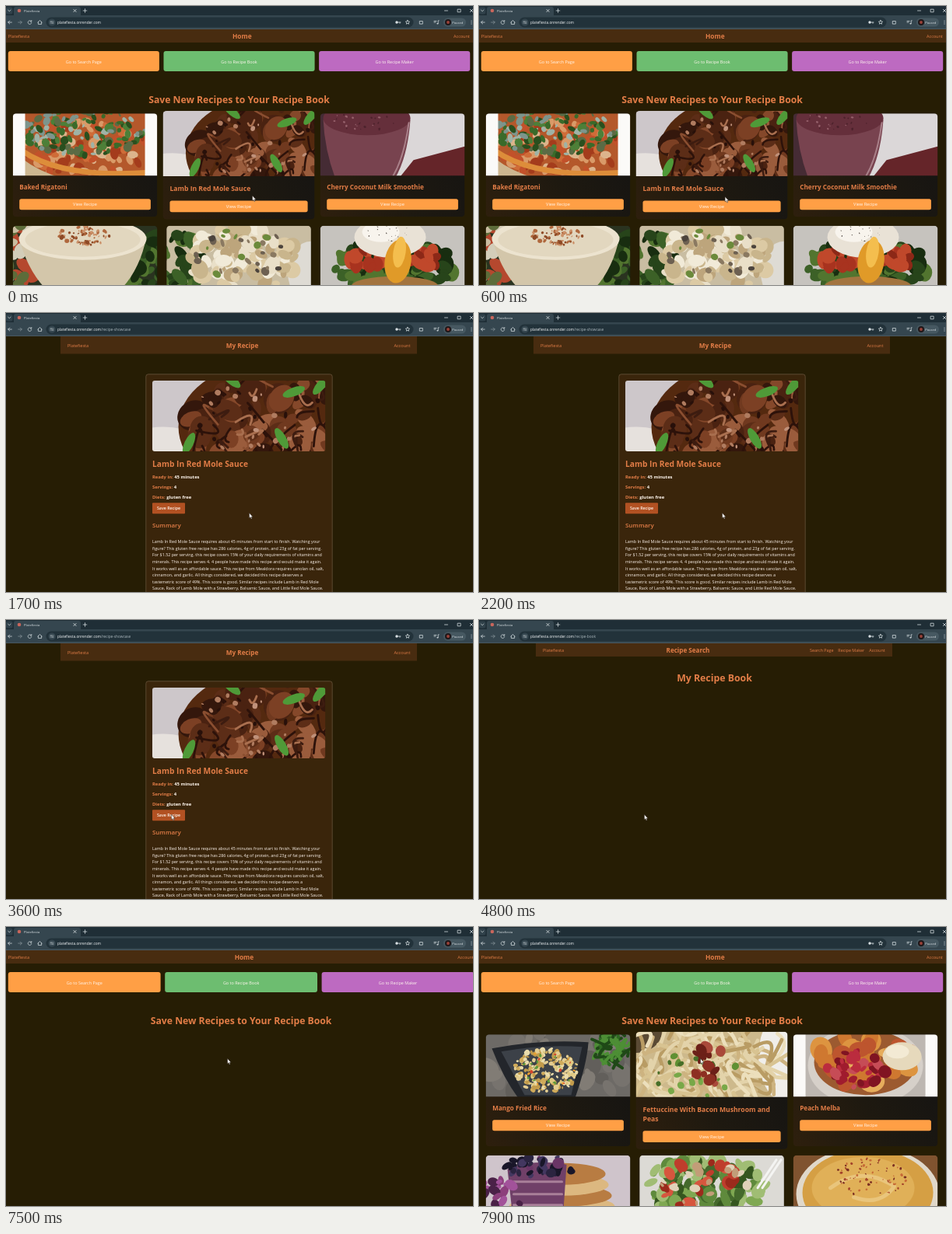
Write an HTML page that moves like this. It is 600x359 px and loops after 8000 ms.

```html
<!DOCTYPE html>
<html lang="en">
<head>
<meta charset="utf-8">
<title>Recipe app walkthrough</title>
<style>
html, body { margin: 0; width: 100%; height: 100%; overflow: hidden; background: #271e04; }
#stage { display: block; width: 600px; height: 359px; font-family: "Open Sans", "Noto Sans", sans-serif; }
text { white-space: pre; }
</style>
</head>
<body>
<svg id="stage" viewBox="0 0 600 359"></svg>
<script>
const LOOP = 8000;
const APP = 'Platefiesta';
const C = { page: '#261d04', nav: '#482c10', accent: '#e27d47', orange: '#ff9f45', hover: '#e98b16', green: '#6dbd70',
  purple: '#bd6ac1', white: '#fff6ee', save: '#b25122', saveHover: '#984218', bar: '#35464f', ink: '#d9e0e3' };

// ---------- drawing helpers ----------
const num = v => +v.toFixed(1);
const rect = (x, y, w, h, fill, r = 0, more = '') =>
  `<rect x="${num(x)}" y="${num(y)}" width="${num(w)}" height="${num(h)}" rx="${r}" fill="${fill}" ${more}/>`;
const oval = (x, y, rx, ry, fill, turn = 0) =>
  `<ellipse rx="${num(rx)}" ry="${num(ry)}" fill="${fill}" transform="translate(${num(x)} ${num(y)}) rotate(${num(turn)})"/>`;
const shape = (d, fill) => `<path d="${d}" fill="${fill}"/>`;
const line = (d, color, w = 1) =>
  `<path d="${d}" fill="none" stroke="${color}" stroke-width="${w}" stroke-linecap="round" stroke-linejoin="round"/>`;
const text = (s, x, y, size, fill, weight = 500, anchor = 'start') =>
  `<text x="${num(x)}" y="${num(y)}" font-size="${size}" fill="${fill}" font-weight="${weight}" text-anchor="${anchor}">${s}</text>`;

let seeds = 0;
function scatter([cx, cy, rx, ry], n, colors, draw) {
  const palette = colors.split(' ');
  let s = ++seeds * 48271, out = '';
  const r = () => (s = s * 16807 % 2147483647) / 2147483647;
  for (let i = 0; i < n; i++) {
    const a = r() * 2 * Math.PI, d = Math.sqrt(r());
    out += draw(cx + Math.cos(a) * d * rx, cy + Math.sin(a) * d * ry, palette[Math.floor(r() * palette.length)], r);
  }
  return out;
}

const blobs = (zone, n, size, colors) => scatter(zone, n, colors, (x, y, color, r) => {
  const w = size * (.4 + .6 * r());
  return oval(x, y, w, w * (.45 + .5 * r()), color, r() * 180);
});

const strands = (zone, n, len, width, colors) => scatter(zone, n, colors, (x, y, color, r) => {
  const off = () => num((r() - .5) * 2 * len);
  return line(`M${num(x)} ${num(y)}q${off()} ${off()} ${off()} ${off()}`, color, width);
});

// ---------- food pictures ----------
const W = 186, H = 80;
const ground = color => rect(-9, -9, 330, 250, color);
const sides = [0, 170].map(x => rect(x, -9, 16, 99, '#fbfaf8')).join('');
const GREENS = '#27441a #3c6127 #182d10 #52752f';

const art = {
  lamb: ground('#cdc7ca') + oval(20, 190, 90, 55, '#e6e1dd') + oval(195, 135, 148, 112, '#54290f') +
    blobs([195, 130, 140, 100], 100, 30, '#5c2d17 #70391f #85482a #9a5c3c #4a2211 #34170c #7c4024') +
    strands([195, 125, 125, 85], 34, 34, 4, '#2d120a #a96f4f #8a4e30 #3d1c10') +
    blobs([195, 120, 125, 80], 30, 6, '#c0917a #b07c60 #28100a') +
    [[255, 72, -20], [142, 50, 40], [66, 165, 115], [233, 156, 60], [304, 60, 130]]
      .map(([x, y, turn]) => oval(x, y, 21, 8, '#4f9a38', turn)).join(''),

  rigatoni: ground('#b4582b') +
    blobs([92, 44, 84, 36], 90, 9, '#c2512a #cf6c38 #d99a68 #a43c1c #dcb48c') +
    blobs([92, 24, 80, 30], 150, 6, '#3a6a2a #4d7f38 #2a4f1e #9fb3a6 #7d958c #5b6b45') +
    line('M12 48Q64 84 176 76', '#dd8d3a', 7) + shape('M12 58Q40 80 90 90H12Z', '#cdb791') + sides,

  smoothie: ground('#dbd7d8') + rect(-9, -9, 40, 99, '#452b34') + shape('M96 90L120 60 195 40V90Z', '#652529') +
    shape('M4 8H116Q112 62 92 90H22Q6 50 4 8Z', '#78434f') + oval(60, 6, 56, 22, '#652f3b') +
    blobs([56, 8, 42, 14], 26, 2, '#95606a #4d222c') + line('M114 12Q108 56 94 80', '#a98089', 2),

  eggnog: ground('#2a3320') + blobs([8, 40, 24, 45], 26, 14, '#b5482e #d3cdb9 #5d6c3a #c9bda0') +
    blobs([172, 50, 26, 45], 34, 14, GREENS) +
    shape('M8 14Q20 64 52 90H130Q162 64 172 14Z', '#d3c6aa') + oval(90, 17, 82, 27, '#ece3cf') + oval(90, 18, 74, 22, '#e2d7bf') +
    blobs([92, 13, 34, 12], 70, 3, '#b0683d #8e4a26 #cb9068'),

  creamy: ground('#c9bda2') + oval(186, 60, 30, 40, '#dedbd4') + blobs([14, 50, 30, 40], 44, 13, GREENS) +
    blobs([98, 42, 72, 42], 110, 13, '#e9dfc8 #dccaa4 #c9b58c #f1ead8 #bda57c') +
    blobs([98, 34, 64, 34], 30, 6, '#4c443d #6d6051 #8a7961 #6b8a3b'),

  egg: ground('#c6c3be') + blobs([93, 52, 80, 30], 110, 14, GREENS) + oval(96, 78, 56, 13, '#a3743f') +
    blobs([60, 42, 26, 14], 16, 13, '#a8331f #c0482b #8c2817') + blobs([136, 44, 20, 14], 14, 12, '#a8331f #c0482b #8c2817') +
    oval(90, 15, 46, 26, '#e9e2d6') + oval(78, 8, 24, 13, '#f8f4ed') + oval(100, 46, 17, 28, '#e09a28', 8) + oval(102, 34, 8, 20, '#f4be4e', 8) +
    blobs([92, 10, 32, 12], 20, 1, '#49403a'),

  rice: ground('#6d6a66') + blobs([93, 40, 95, 45], 50, 18, '#77736e #625f5b #817c75') +
    strands([162, 16, 24, 20], 40, 20, 4, '#2f6b22 #4d8e35 #1f4917') +
    shape('M8 18Q70 6 132 10Q130 40 112 90H48Q24 60 8 18Z', '#23262b') + shape('M20 22Q74 12 124 16L110 78H50Z', '#3c4148') +
    blobs([78, 46, 42, 28], 170, 4, '#dfc882 #d0ab5a #eadcac #c29b4b #e3cc90') + blobs([78, 46, 38, 24], 30, 2.5, '#d4452c #5e9a3a #f2a02c'),

  fettuccine: ground('#cdb98c') + oval(190, 30, 40, 60, '#f0eeea') + oval(0, 0, 32, 26, '#5a4a34') +
    strands([84, 42, 88, 48], 120, 44, 4.5, '#e3d3aa #cdb380 #ecdfbc #b99c64 #d8c391') +
    blobs([74, 50, 54, 30], 30, 5, '#5f9033 #78a848 #476f28') + blobs([92, 42, 26, 24], 18, 9, '#8d2f22 #a9493a #6c2018'),

  melba: ground('#bdb7b1') + oval(93, 40, 74, 52, '#d6d0c9') + oval(93, 36, 66, 42, '#9c5a30') +
    blobs([93, 32, 62, 32], 40, 17, '#dd9440 #e6ad5c #cf7830 #bd552e') + blobs([82, 44, 38, 24], 44, 9, '#a01c2e #bb2c3e #801422 #c64c56') +
    oval(140, 28, 25, 18, '#e6d9bc') + oval(134, 22, 15, 9, '#f3ead4') + sides,

  pancakes: ground('#cfc4cb') + [66, 52, 38, 24].map((y, i) => oval(98, y, 68 - i * 4, 14, i % 2 ? '#b87c42' : '#dcb880')).join('') +
    shape('M28 18Q64 4 104 12L100 70 34 72Z', '#704068') + [34, 50, 64].map(y => line(`M36 ${y}H98`, '#a98099', 3)).join('') +
    blobs([72, 14, 46, 13], 36, 8, '#2b2440 #433760 #191629 #6a3566') + blobs([16, 54, 30, 28], 36, 9, '#a2529a #d9c9d4 #4a2147 #8c3f7c'),

  salad: ground('#dcdad5') + blobs([82, 40, 76, 40], 110, 13, '#5f8a3c #7fa852 #44692c #a0bd74 #35561f') +
    blobs([84, 38, 62, 30], 26, 10, '#bf3d2c #d6563e #9c2a1c') + blobs([84, 38, 60, 28], 20, 7, '#e0d2b8 #c29d78') +
    [0, 6].map(x => line(`M${176 + x} 6L${152 + x} 42`, '#f4f4f2', 3)).join(''),

  soup: ground('#80532f') + oval(96, 50, 92, 62, '#e0d8ca') + oval(96, 48, 84, 56, '#d59f44') + oval(90, 42, 66, 40, '#e0b058') +
    line('M48 42Q88 12 130 40Q112 66 78 54', '#e9c57c', 5) + blobs([100, 28, 46, 25], 70, 2, '#a3432a #c66a36 #7c2f22')
};
const photo = (name, w, h) =>
  `<svg width="${w}" height="${h}" viewBox="0 0 ${name === 'lamb' ? '312 231' : `${W} ${H}`}" preserveAspectRatio="xMidYMid slice">
  <g filter="url(#soft)">${art[name]}</g></svg>`;

let clips = 0;
function clipped(w, h, r, body) {
  const id = 'clip' + clips++;
  return `<clipPath id="${id}"><rect width="${w}" height="${h}" rx="${r}"/></clipPath><g clip-path="url(#${id})">${body}</g>`;
}

// ---------- page parts ----------
function card(x, y, w, h, name, titles, raised = false, id = '') {
  const top = 98.5 + 11.5 * titles.length;
  const body = rect(0, 0, w, h, 'url(#cardFill)') + photo(name, w, H) +
    titles.map((s, i) => text(s, 8.5, 98 + 12 * i, 8.2, C.accent, 700)).join('') +
    rect(8.5, top, w - 17, 14, C.orange, 2.5, id && `id="${id}"`) +
    text('View Recipe', w / 2, top + 9.2, 5.6, C.white, 500, 'middle');
  const lift = raised ? `translate(${w / 2} ${h / 2}) scale(1.05) translate(${-w / 2} ${-h / 2})` : '';
  return `<g transform="translate(${x} ${y}) ${lift}">${clipped(w, h, 4.5, body)}</g>`;
}

// Two rows of three; the middle card of the first row is raised.
function grid(h, names, titles, id) {
  return names.split(' ').map((name, i) => {
    const row = Math.floor(i / 3), mid = i === 1;
    return card(num(8.7 + 197.5 * (i % 3)), num(138.3 + row * (h + 11.4)), 185.7, h, name, titles[i] || [''], mid, mid ? id : '');
  }).join('');
}

function home(width, content) {
  const pitch = (width - 1) / 3, w = pitch - 5.6;
  const links = [['Search Page', C.orange], ['Recipe Book', C.green], ['Recipe Maker', C.purple]];
  return rect(0, 30, width, 17, C.nav) + text(APP, 2.8, 41, 5.6, C.accent) +
    text('Home', width / 2 + 3.3, 42, 8.3, C.accent, 700, 'middle') + text('Account', width - 4.2, 41, 5.5, C.accent, 500, 'end') +
    links.map(([s, fill], i) => rect(2.8 + i * pitch, 58, w, 26, fill, 3) +
      text('Go to ' + s, 2.8 + i * pitch + w / 2, 73.6, 5.45, C.white, 500, 'middle')).join('') +
    text('Save New Recipes to Your Recipe Book', width / 2 - .5, 124.8, 12.2, C.accent, 700, 'middle') + content;
}

const summary = [
  'Lamb In Red Mole Sauce requires about 45 minutes from start to finish. Watching your',
  'figure? This gluten free recipe has 286 calories, 4g of protein, and 23g of fat per serving.',
  'For $1.52 per serving, this recipe covers 15% of your daily requirements of vitamins and',
  'minerals. This recipe serves 4. 4 people have made this recipe and would make it again.',
  'It works well as an affordable sauce. This recipe from Mealdora requires canolan oil, salt,',
  'cinnamon, and garlic. All things considered, we decided this recipe deserves a',
  'tastemetric score of 49%. This score is good. Similar recipes include Lamb in Red Mole',
  'Sauce, Rack of Lamb Mole with a Strawberry, Balsamic Sauce, and Little Red Mole Sauce.'
];
const facts = [['Ready in:', '45 minutes'], ['Servings:', '4'], ['Diets:', 'gluten free']];

const recipe = rect(70, 30, 458, 22.5, C.nav) + text(APP, 79, 43.6, 5.6, C.accent) +
  text('My Recipe', 303.5, 45, 8.2, C.accent, 700, 'middle') + text('Account', 519.5, 43.6, 5.6, C.accent, 500, 'end') +
  rect(179.8, 78.8, 239.4, 300, '#3a250b', 3, 'stroke="#6d5b43" stroke-width=".7"') +
  `<g transform="translate(188 87)">${clipped(222.4, 91, 3, photo('lamb', 222.4, 91))}</g>` +
  text('Lamb In Red Mole Sauce', 188, 197.8, 10.2, C.accent, 700) +
  facts.map(([k, v], i) => text(`${k} <tspan fill="${C.white}">${v}</tspan>`, 188, 213 + 13 * i, 5.85, C.accent, 700)).join('') +
  rect(188, 244.2, 42, 14, C.save, 1, 'id="save"') + text('Save Recipe', 209, 253.3, 5.3, C.white, 600, 'middle') +
  text('Summary', 188, 275.6, 7.9, C.accent, 600) +
  summary.map((s, i) => text(s, 188, 296.2 + 8.57 * i, 5.36, C.white)).join('');

const book = rect(73, 30, 458, 17, C.nav) + text(APP, 82, 41, 5.6, C.accent) +
  text('Recipe Search', 268.5, 42, 8.1, C.accent, 700, 'middle') +
  text('Search Page', 425, 41, 5.4, C.accent) + text('Recipe Maker', 461.3, 41, 5.4, C.accent) + text('Account', 501.3, 41, 5.4, C.accent) +
  text('My Recipe Book', 302.5, 79, 12.3, C.accent, 700, 'middle') +
  `<g id="saved">${card(88, 93, 135, 132.5, 'lamb', ['Lamb In Red Mole Sauce'])}</g>`;

// ---------- browser frame ----------
const icon = (x, y, d, turn = 0) => `<g transform="translate(${x} ${y}) rotate(${turn})">${line(d, C.ink, .75)}</g>`;
const plus = 'M-2.3 0H2.3M0-2.3V2.3', arrow = 'M2.3 0H-2.3M-.3-2L-2.3 0-.3 2', box = 'M-1.8-1.8H1.8V1.8H-1.8Z';
const star = 'M' + Array.from({ length: 10 }, (_, i) => {
  const a = i * Math.PI / 5, r = i % 2 ? 1.3 : 2.7;
  return `${num(Math.sin(a) * r)} ${num(-Math.cos(a) * r)}`;
}).join('L') + 'Z';

const browser = rect(0, 0, 600, 30, C.bar) + rect(0, 0, 600, 12, '#1f2e36') + rect(10, 1, 86, 14, C.bar, 3) +
  rect(0, 1.5, 8.5, 9, '#30414a', 2.5) + icon(4.3, 6, 'M-1.7-.8L0 .8 1.7-.8') +
  oval(17, 6, 2.3, 2.3, '#c9665c') + text(APP, 23, 7.6, 4.2, C.ink) +
  icon(88.5, 6, plus, 45) + icon(101.5, 6, plus) + icon(565.5, 6, 'M-2 0H2') + icon(582.3, 6, box) + icon(598, 6, plus, 45) +
  icon(5, 21, arrow) + `<g opacity=".5">${icon(18, 21, arrow, 180)}</g>` +
  icon(30.5, 21, 'M1.8-1.4A2.3 2.3 0 1 0 2.3.6M2.3-2.5V-1H.8') + icon(43.5, 21, 'M-2.1-.4V2.4H2.1V-.4M-2.6 0L0-2.5 2.6 0') +
  rect(51.5, 14.5, 472, 13, '#22323a', 6.5) + oval(59, 21, 4.6, 4.6, C.bar) + icon(59, 21, 'M-2-1H.4M1.8-1H2M2 1H-.4M-1.8 1H-2') +
  `<text x="66" y="22.8" font-size="4.75" font-weight="500" fill="#f2f5f6">platefiesta.onrender.com<tspan id="path" fill="#aab6bc"></tspan></text>` +
  oval(502, 21, 1.7, 1.7, C.ink) + icon(505, 21, 'M-2 0H2M1 0V1.3') + icon(516, 21, star) +
  icon(533.5, 21.3, box) + icon(552, 21, 'M-2-1.6H1M-2 0H0M3.2 1.7V-2.2H4.2') + oval(554.4, 22.7, 1, .8, C.ink) +
  rect(562, 15.5, 29, 11, '#465861', 5.5) + oval(568, 21, 4, 4, '#1e1719') + oval(568, 21, 1.9, 1.9, '#9c4238') +
  text('Paused', 573.2, 22.6, 4.1, C.ink) + [19, 21, 23].map(y => oval(598, y, .6, .6, C.ink)).join('') +
  rect(0, 29.2, 600, .8, '#4d5c63');

const first = grid(133, 'rigatoni lamb smoothie eggnog creamy egg',
  [['Baked Rigatoni'], ['Lamb In Red Mole Sauce'], ['Cherry Coconut Milk Smoothie']], 'view');
const second = grid(144, 'rice fettuccine melba pancakes salad soup',
  [['Mango Fried Rice'], ['Fettuccine With Bacon Mushroom and', 'Peas'], ['Peach Melba']]);

const scenes = [
  { from: 0, path: '', body: home(600, first) },
  { from: 1500, path: '/recipe-showcase', body: recipe },
  { from: 4700, path: '/recipe-book', body: book },
  { from: 6900, path: '', body: home(605.2, '') },
  { from: 7700, path: '', body: home(600, second) }
];

document.getElementById('stage').innerHTML = `<defs>
  <filter id="soft"><feGaussianBlur stdDeviation=".7"/></filter>
  <linearGradient id="cardFill" x1="0" y1="1" x2="1" y2=".6">
  <stop offset="0" stop-color="#2e1f0d"/><stop offset=".55" stop-color="#1e1910"/><stop offset="1" stop-color="#171512"/>
  </linearGradient></defs>` + rect(0, 0, 600, 359, C.page) +
  scenes.map(s => `<g class="scene">${s.body}</g>`).join('') + browser +
  `<g id="cursor" fill="#fff" stroke="#2a2119" stroke-width=".5" stroke-linejoin="round">
    <path id="arrow" d="M0 0V6.6L1.5 5.3 2.5 7.6 3.6 7.1 2.6 4.9H4.6Z"/>
    <path id="hand" d="M-.7.5Q0-.6.7.5V3L2.9 3.6Q3.5 4 3.3 5.3L2.6 7.4H-.8L-2.4 5Q-2.6 4-1.8 4.2L-.7 5Z"/></g>`;

// ---------- timing ----------
const home0 = [316.5, 244];
const moves = [
  { from: 500, to: 1000, at: [312.5, 257.3] },
  { from: 2900, to: 3600, at: [212.4, 250.3] },
  { from: 5200, to: 6100, at: [122.4, 50.3] },
  { from: 6250, to: 6600, at: [97, 37.5] },
  { from: 6950, to: 7400, at: [284.5, 169.3] }
];
const ease = k => k * k * (3 - 2 * k);
const pointer = t => moves.reduce((p, m) => {
  const k = ease(Math.min(1, Math.max(0, (t - m.from) / (m.to - m.from))));
  return p.map((v, i) => v + (m.at[i] - v) * k);
}, home0);
const within = (t, from, to) => t >= from && t < to;

const $ = id => document.getElementById(id);
const groups = [...document.querySelectorAll('.scene')];
const show = (node, on) => { node.style.display = on ? '' : 'none'; };

function draw(t) {
  const now = scenes.filter(s => s.from <= t).length - 1;
  const onView = within(t, 900, 1500), onSave = within(t, 3650, 4700), onHome = within(t, 6550, 6900);
  const hand = onView || onSave || onHome;
  groups.forEach((g, i) => show(g, i === now));
  $('path').textContent = scenes[now].path;
  show($('saved'), t >= 5200);
  $('view').setAttribute('fill', onView ? C.hover : C.orange);
  $('save').setAttribute('fill', onSave ? C.saveHover : C.save);
  show($('hand'), hand);
  show($('arrow'), !hand);
  $('cursor').setAttribute('transform', `translate(${pointer(t).map(num).join(' ')})`);
}

const start = performance.now();
function tick() {
  draw((performance.now() - start) % LOOP);
  requestAnimationFrame(tick);
}
tick();
</script>
</body>
</html>
```
